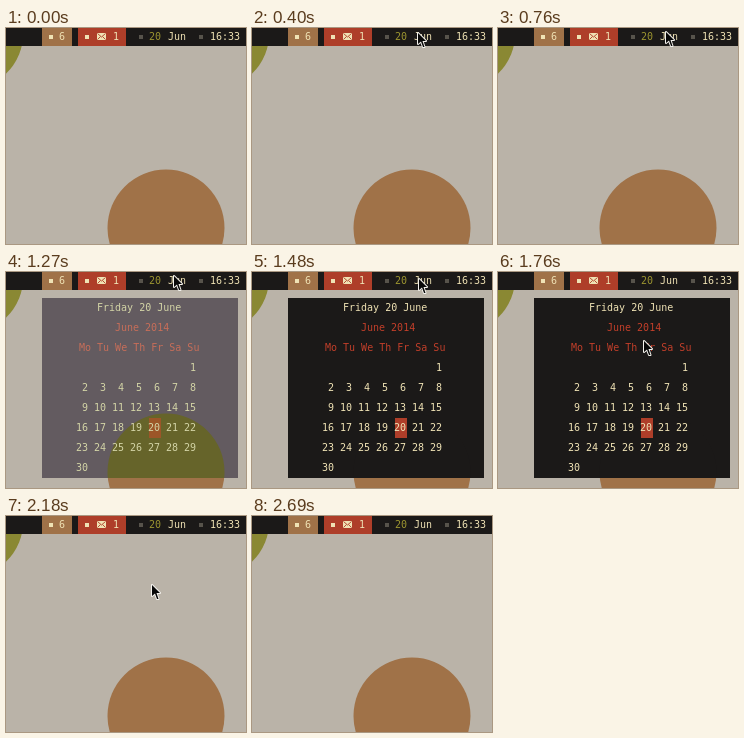
Write an HTML page with a canvas that moves like this. It is 240 by 216 pixels and loops after 2.73 s.

```html
<!DOCTYPE html>
<html lang="en">
<head>
<meta charset="utf-8">
<title>Calendar popup</title>
<style>
html, body { margin: 0; width: 100%; height: 100%; overflow: hidden; background: #bab3a8; }
canvas { display: block; }
</style>
</head>
<body>
<canvas id="stage" width="240" height="216"></canvas>
<script>
const ctx = document.getElementById('stage').getContext('2d');
const LOOP = 2730, STEP = 40;
const DARK = '#1b1918', CREAM = '#efe2b4', BROWN = '#a07248', RED = '#ae3e29',
      OLIVE = '#8a8833', DIM = '#57534b';

// Popup looks: box, disc seen through it, text, headings, today marker
const solid = { box: DARK, disc: DARK, text: CREAM, head: '#c23f2a', mark: RED };
const warm = { box: '#635b60', disc: '#66642a', text: '#d3d4a6', head: '#c76e59', mark: '#9c5628' };
const cool = { box: '#635b60', disc: '#522c1c', text: '#d3d4a6', head: '#ba7850', mark: '#a8682f' };
const faint = { box: '#96908a', disc: '#7c5233', text: '#cdc7ac', head: '#b98b78', mark: '#a46c3d' };
const looks = [[0, null], [440, warm], [480, solid], [720, warm], [760, null],
  [1270, warm], [1310, solid], [2100, cool], [2140, faint], [2180, null]];

const easeOut = u => 1 - (1 - u) ** 2;
const smooth = u => u * u * (3 - 2 * u);

// Pointer moves: first step, last step, from, to, easing
const moves = [
  [40, 440, [-14, 92], [167, 3], easeOut],
  [1440, 1760, [167, 3], [145, 68], smooth],
  [2450, 2690, [145, 68], [-14, 113], smooth]
];

function rect(color, x, y, w, h) {
  ctx.fillStyle = color;
  ctx.fillRect(x, y, w, h);
}

function disc(color, x, y) {
  ctx.fillStyle = color;
  ctx.beginPath();
  ctx.arc(x, y, 58.5, 0, 7);
  ctx.fill();
}

function text(str, x, y, color) {
  ctx.fillStyle = color;
  ctx.fillText(str, x, y);
}

function drawBar() {
  rect(DARK, 0, 0, 240, 18);
  rect(BROWN, 36, 0, 30, 18);
  rect(RED, 72, 0, 48, 18);
  rect(CREAM, 43, 7, 4, 4);
  rect(CREAM, 79, 7, 4, 4);
  rect(DIM, 133, 7, 4, 4);
  rect(DIM, 193, 7, 4, 4);
  text('6', 53, 12, CREAM);
  text('1', 107, 12, CREAM);
  text('20', 143, 12, '#9b9430');
  text('Jun', 162, 12, CREAM);
  text('16:33', 204, 12, CREAM);

  rect(CREAM, 91, 5, 9, 7);
  ctx.strokeStyle = RED;
  ctx.lineWidth = 0.9;
  ctx.stroke(new Path2D('M91.5 5.5 95.5 9 99.5 5.5M91.5 11.5 94.5 8.5M99.5 11.5 96.5 8.5'));
}

function drawPopup(look) {
  ctx.save();
  ctx.beginPath();
  ctx.rect(36, 26, 196, 180);
  ctx.clip();
  rect(look.box, 36, 26, 196, 180);
  disc(look.disc, 160, 200);
  ctx.restore();

  text('Friday 20 June', 91, 39, look.text);
  text('June 2014', 109, 59, look.head);
  text('Mo Tu We Th Fr Sa Su', 73, 79, look.head);
  rect(look.mark, 143, 146, 12, 20);
  for (let day = 1; day <= 30; day++) {
    const cell = day + 5;
    text(String(day).padStart(2), 70 + cell % 7 * 18, 99 + Math.floor(cell / 7) * 20, look.text);
  }
}

const arrow = new Path2D('M1 1V12L4 9.5 6 15H7.5L5.5 9H9Z');

function drawPointer(t) {
  const move = moves.findLast(m => t >= m[0]);
  if (!move) return;
  const [start, end, a, b, ease] = move;
  const held = Math.floor((t - start) / STEP) * STEP;
  const u = ease(Math.min(1, held / (end - start)));
  const [x, y] = a.map((v, i) => Math.round(v + (b[i] - v) * u));
  ctx.save();
  ctx.translate(x, y);
  ctx.fillStyle = '#080808';
  ctx.strokeStyle = '#f4f2ed';
  ctx.lineWidth = 2;
  ctx.lineJoin = 'round';
  ctx.stroke(arrow);
  ctx.fill(arrow);
  ctx.restore();
}

function draw(t) {
  ctx.font = '10px "DejaVu Sans Mono", monospace';
  rect('#bab3a8', 0, 0, 240, 216);
  disc(OLIVE, -41, 4);
  disc(BROWN, 160, 200);
  drawBar();
  const look = looks.findLast(l => t >= l[0])[1];
  if (look) drawPopup(look);
  drawPointer(t);
}

let begin;
function tick(now) {
  begin ??= now;
  draw((now - begin) % LOOP);
  requestAnimationFrame(tick);
}
draw(0);
requestAnimationFrame(tick);
</script>
</body>
</html>
```
